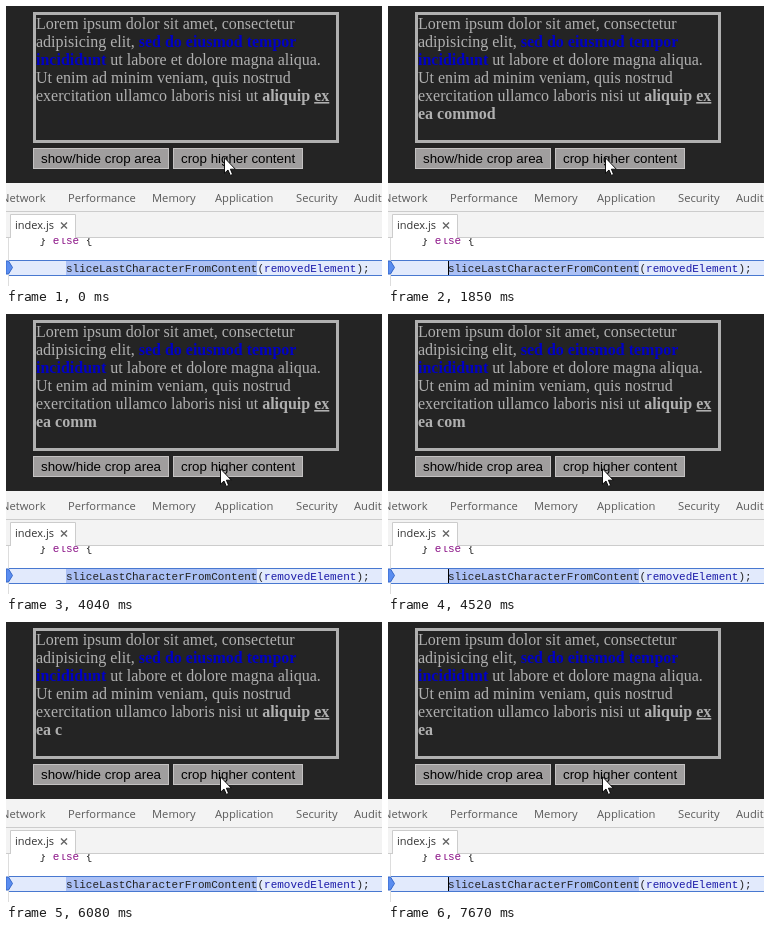
An HTML page that plays this animation: 376 px wide and 280 px high, repeating every 8 s.

```html
<!DOCTYPE html>
<html lang="en">
<head>
<meta charset="utf-8">
<title>Cropping text in the debugger</title>
<style>
  html, body { margin: 0; width: 100%; height: 100%; overflow: hidden; background: #242424; }
  svg { display: block; width: 376px; height: 280px; }
  .page { font: 16px "Liberation Serif", "Times New Roman", serif; fill: #b0b0b0; }
  .link { font-weight: bold; fill: #0000c4; }
  .bold { font-weight: bold; }
  .under { text-decoration: underline; }
  .button rect { fill: #a09e9e; stroke: #c4c2c2; }
  .button text { font: 13.333px "Liberation Sans", Arial, sans-serif; fill: #000; }
  .tabs { font: 11.2px "Open Sans", "Noto Sans", sans-serif; fill: #5a5a5a; }
  .file { font: 11px "Open Sans", "Noto Sans", sans-serif; fill: #333; }
  .code { font: 11px "Liberation Mono", monospace; fill: #222; white-space: pre; }
  .keyword { fill: #8a1186; }
  .variable { fill: #1a1aa8; }
</style>
</head>
<body>
<svg viewBox="0 0 376 280">
  <rect width="376" height="280" fill="#242424"/>

  <rect x="28.5" y="7.5" width="303" height="128" fill="none" stroke="#b0b0b0" stroke-width="3"/>
  <g class="page">
    <text x="30" y="23">Lorem ipsum dolor sit amet, consectetur</text>
    <text x="30" y="41">adipisicing elit, <tspan class="link">sed do eiusmod tempor</tspan></text>
    <text x="30" y="59"><tspan class="link">incididunt</tspan> ut labore et dolore magna aliqua.</text>
    <text x="30" y="77">Ut enim ad minim veniam, quis nostrud</text>
    <text x="30" y="95">exercitation ullamco laboris nisi ut <tspan class="bold">aliquip <tspan class="under">ex</tspan></tspan></text>
    <text x="30" y="113" class="bold" id="tail"></text>
  </g>

  <g class="button">
    <rect x="27.5" y="142.5" width="135" height="20"/>
    <text x="35" y="157">show/hide crop area</text>
    <rect x="167.5" y="142.5" width="129" height="20"/>
    <text x="175" y="157">crop higher content</text>
  </g>

  <rect y="177" width="376" height="103" fill="#f3f3f3"/>
  <g class="tabs">
    <text x="-5" y="196">Network</text>
    <text x="62" y="196">Performance</text>
    <text x="146" y="196">Memory</text>
    <text x="209" y="196">Application</text>
    <text x="290" y="196">Security</text>
    <text x="348" y="196">Audits</text>
  </g>
  <path d="M0 205.5H376M0 231.5H376" stroke="#ccc"/>
  <rect y="232" width="376" height="48" fill="#fff"/>
  <path d="M4.5 232V208.5H69.5V232" fill="#fff" stroke="#ccc"/>
  <text class="file" x="9" y="223">index.js</text>
  <path d="M55 216.5l6 6m0-6l-6 6" stroke="#666" stroke-width="1.4"/>

  <clipPath id="editor"><rect y="232" width="376" height="48"/></clipPath>
  <g clip-path="url(#editor)">
    <path d="M2.5 232V280" stroke="#ddd"/>
    <g id="paused">
      <rect x="3" y="254" width="373" height="16" fill="#e2eafc"/>
      <path d="M3 254.5H376M3 269.5H376" stroke="#4878d0"/>
      <rect x="60" y="255" width="191" height="14" fill="#abc0f5"/>
    </g>
    <path d="M0 255H2.5L6.5 261.5L2.5 268H0Z" fill="#5a8df0" stroke="#3567c8"/>
    <text class="code" x="33.6" y="238">} <tspan class="keyword">else</tspan> {</text>
    <text class="code" x="60" y="266">sliceLastCharacterFromContent(<tspan class="variable">removedElement</tspan>);</text>
    <rect id="caret" x="60" y="255" width="1" height="14"/>
  </g>

  <path id="pointer" d="M.5 .8V16.2L4 13L6.3 18.4L8.6 17.4L6.4 12.2H11.3Z" fill="#fff" stroke="#000" stroke-width=".9"/>
</svg>
<script>
  const LOOP = 8000;
  const $ = id => document.getElementById(id);
  const tail = $('tail'), paused = $('paused'), caret = $('caret'), pointer = $('pointer');

  // Times at which one letter is cut from the tail.
  const WORDS = 'ea commod', SHOWN = 1520;
  const cuts = [2330, 3430, 4220, 5020, 5710, 6570];

  // Each pair of neighbouring times toggles a state.
  const caretFlips = [420, 950, 1460, 1960, 2450, 3000, 3490, 3920, 4520, 5020, 5600, 6080, 6690, 7120, 7670];
  const runFlips = [2330, 2390, 4220, 4280, 5020, 5080, 5830, 5890, 6570, 6630, 7240, 7300];

  const path = [
    [0, 218, 151], [210, 217, 151], [360, 216, 152], [420, 217, 151],
    [950, 217, 150], [1010, 218, 148], [1150, 218, 150], [1570, 217, 151],
    [1960, 216, 152], [2210, 215, 154], [2560, 215, 155], [3120, 214, 156],
    [3920, 214, 155], [4040, 214, 154]
  ];

  const passed = (times, t) => times.filter(x => x <= t).length;
  const isOn = (flips, t) => passed(flips, t) % 2 === 1;
  const show = (el, on) => el.setAttribute('visibility', on ? 'visible' : 'hidden');

  function draw(now) {
    const t = now % LOOP;
    const text = t < SHOWN ? '' : WORDS.slice(0, WORDS.length - passed(cuts, t)).trim();
    if (tail.textContent !== text) tail.textContent = text;
    show(caret, isOn(caretFlips, t));
    show(paused, !isOn(runFlips, t));
    const [, x, y] = path[passed(path.map(p => p[0]), t) - 1];
    pointer.setAttribute('transform', `translate(${x} ${y})`);
  }

  const start = performance.now();
  function tick() {
    draw(performance.now() - start);
    requestAnimationFrame(tick);
  }
  tick();
</script>
</body>
</html>
```
